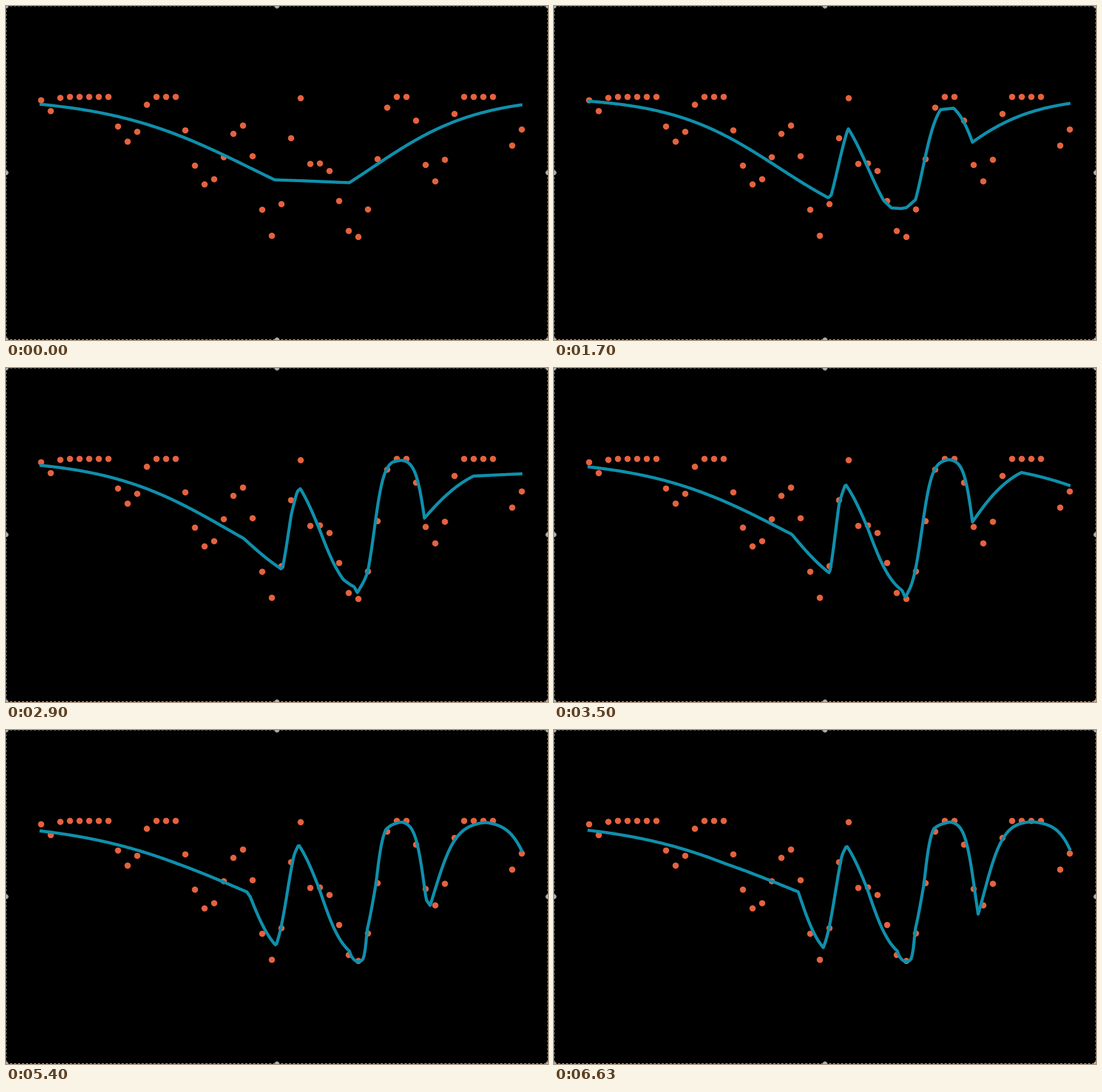
An HTML page for the animation above (6.67 s loop, 952 px wide and 588 px high).

```html
<!DOCTYPE html>
<html lang="en">
<head>
<meta charset="utf-8">
<title>Curve fitting</title>
<style>
  html, body { margin: 0; width: 100%; height: 100%; overflow: hidden; background: #000; }
  svg { display: block; width: 952px; height: 588px; }
  path { fill: none; }
  #dots { stroke: #e5623f; stroke-width: 11; stroke-linecap: round; }
  #curve { stroke: #0f8fab; stroke-width: 5.4; stroke-linejoin: round; }
  #frame path { stroke-width: 1.4; stroke-dasharray: 4 3; }
  #frame circle { fill: #b0b0b0; stroke: #777; }
</style>
</head>
<body>
<svg viewBox="0 0 952 588">
  <g id="frame">
    <path d="M0 .5H952" stroke="#505050"/>
    <path d="M.5 0V588M951.5 0V588" stroke="#777"/>
    <path d="M0 587.5H952" stroke="#a8a8a8"/>
  </g>
  <path id="dots"/>
  <path id="curve"/>
</svg>
<script>
const LOOP = 6670, LEFT = 59, RIGHT = 907, TOP = 160, RANGE = 250;
const $ = id => document.getElementById(id);
const mix = (a, b, u) => a + (b - a) * u;
const linear = u => u;
const wave = u => (1 - Math.cos(Math.PI * u)) / 2;

// Value at x of a line through knots [x, y].
function along(knots, x, ease) {
  let k = 0;
  while (k < knots.length - 2 && x > knots[k + 1][0]) k++;
  const [x0, y0] = knots[k], [x1, y1] = knots[k + 1];
  return mix(y0, y1, ease((x - x0) / (x1 - x0)));
}

for (const x of [0, 476, 952])
  for (const y of [0, 293.5, 588])
    if (x !== 476 || y !== 293.5)
      $('frame').innerHTML += `<circle cx="${x}" cy="${y}" r="4.2"/>`;

// The data is a wave through its crests and dips, clipped at the top.
const turns = [[0, 166], [1, 185], [2.2, 160], [5.3, 100], [9.1, 239], [12.7, 119],
  [17.25, 315.5], [20.9, 210], [24, 404.5], [27.15, 161], [28, 278], [29.3, 277],
  [32.7, 409.5], [37.4, 120], [40.9, 309], [45, 80], [49.1, 246], [51.4, 160]];
let dots = '';
for (let i = 0; i <= 50; i++) {
  if (i === 48) continue; // missing sample
  dots += `M${61.7 + i * 16.886} ${Math.max(TOP, along(turns, i, wave))}h.01`;
}
$('dots').setAttribute('d', dots);

// The model is a sigmoid over a piecewise linear function.
const logit = y => { const p = 1 - (y - TOP) / RANGE; return Math.log(p / (1 - p)); };
const sigmoidY = v => TOP + RANGE / (1 + Math.exp(v));
const fit = (time, ...points) => ({ time, knots: points.map(([x, y]) => [x, logit(y)]) });

// The finished fit, drifting slowly as d goes from 0 to 1.
const settled = (time, d) => fit(time,
  [60, 178.5 - 2 * d], [300, 235], [423 + 6 * d, 287 - 2 * d], [475 - 2 * d, 376 + 7 * d],
  [506, 220], [514, 201 + 3 * d], [551, 282], [603, 389], [610, 403], [618, 408], [626, 405],
  [634, 353], [650, 270], [667, 177 - 3 * d], [694 + 3 * d, 162], [738 + 7 * d, 316 + 8 * d],
  [790, 193 - 4 * d], [845 - 7 * d, 164 - 2.5 * d], [906, 215 - 5 * d]);

const stages = [
  fit(0, [60, 173], [472, 306], [603, 311], [906, 174]),
  fit(1070, [60, 166], [482, 329], [516, 219], [579, 330], [610, 325], [683, 255], [906, 170]),
  fit(2230, [60, 169], [487, 347], [517, 213], [593, 373], [619, 377], [635, 366],
    [679, 165], [702, 165], [735, 257], [906, 173]),
  fit(3500, [60, 174], [418, 293], [484, 361], [501, 238], [512, 205], [551, 282], [612, 392],
    [617, 403], [622, 394], [668, 180], [694, 161.3], [735, 271], [821, 184], [906, 207]),
  settled(4470, 0),
  settled(6630, 1)];

function draw(now) {
  const t = Math.min(now % LOOP, 6630);
  let i = 0;
  while (i < stages.length - 2 && t >= stages[i + 1].time) i++;
  const a = stages[i], b = stages[i + 1];
  let u = (t - a.time) / (b.time - a.time);
  if (i === 0) u = 1 - (1 - u) ** 2; // learning starts fast
  const points = [];
  for (let x = LEFT; x <= RIGHT; x += 2) {
    const v = mix(along(a.knots, x, linear), along(b.knots, x, linear), u);
    points.push(`${x} ${sigmoidY(v).toFixed(2)}`);
  }
  $('curve').setAttribute('d', 'M' + points.join('L'));
}

const start = performance.now();
function tick() {
  draw(performance.now() - start);
  requestAnimationFrame(tick);
}
tick();
</script>
</body>
</html>
```
